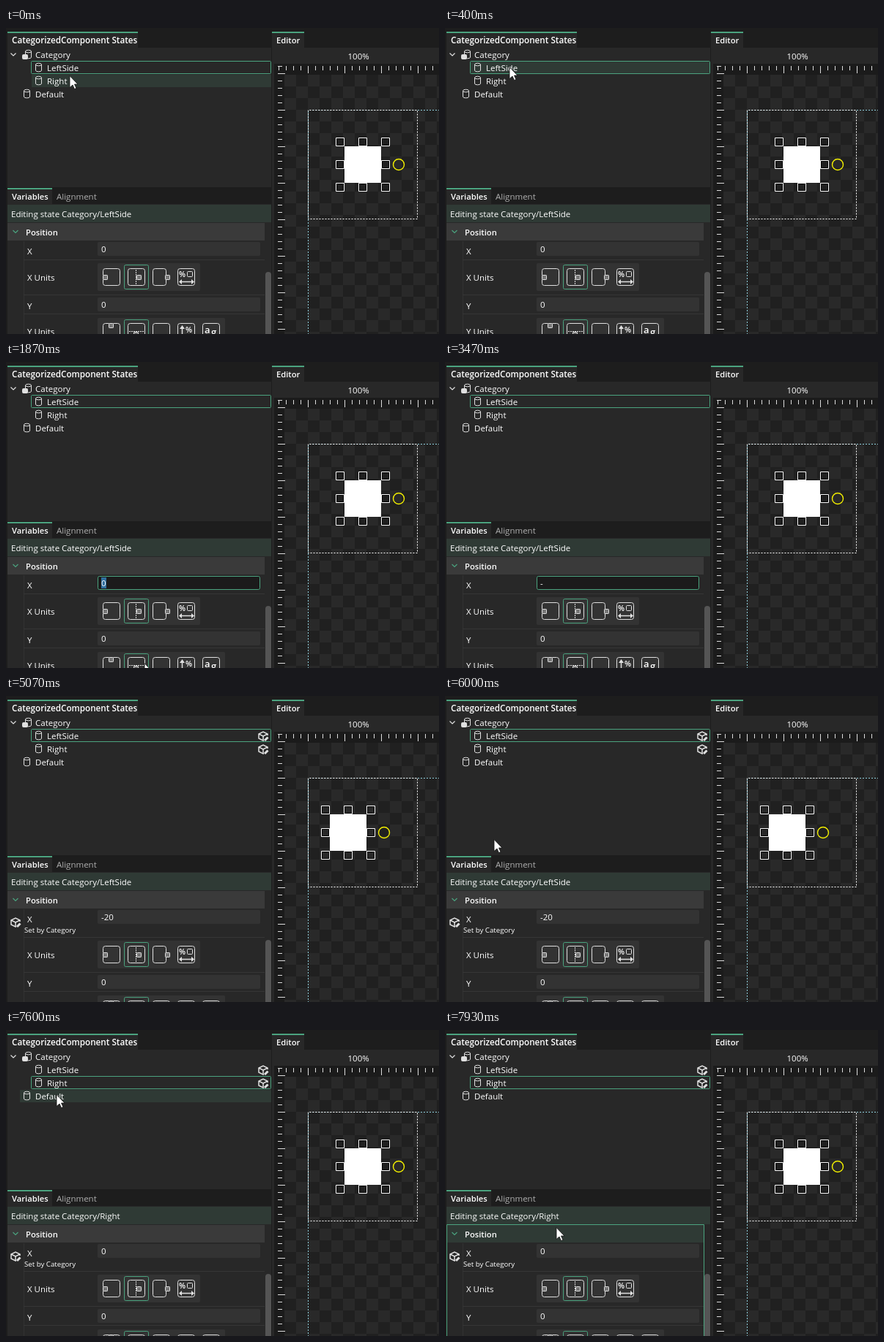
Write an HTML page with a canvas that moves like this. It is 591x419 px and loops after 8000 ms.

```html
<!DOCTYPE html>
<html lang="en">
<head>
<meta charset="utf-8">
<title>State editor</title>
<style>
html, body { margin: 0; width: 100%; height: 100%; overflow: hidden; background: #1d1d1d; }
canvas { display: block; }
</style>
</head>
<body>
<canvas id="stage" width="591" height="419"></canvas>
<script>
const ctx = document.getElementById('stage').getContext('2d');
const LOOP = 8000, FRAME = 1000 / 15;
const BACK = '#1d1d1d', PANEL = '#282828', FIELD = '#333333', HEADER = '#3a3a3a', HOVER = '#2f3a35';
const GREEN = '#4ba37f', TEXT = '#ffffff', ICON = '#e0e0e0';

// Pointer stops: time, x, y
const POINTER = [
  [0, 87, 65], [66, 87, 57], [133, 87, 52], [333, 87, 52], [400, 88, 53], [666, 88, 53],
  [1000, 160, 282], [1200, 195, 300], [1600, 195, 300], [1933, 188, 440],
  [5733, 84, 440], [5800, 82, 381], [6000, 67, 196], [6533, 62, 72], [7533, 62, 72], [7933, 159, 286], [8000, 159, 286]
];

function pointerAt(time) {
  const next = Math.max(1, POINTER.findIndex(stop => stop[0] > time));
  const [t0, x0, y0] = POINTER[next - 1], [t1, x1, y1] = POINTER[next];
  let k = (time - t0) / (t1 - t0);
  if (t0 === 6000) k = 1 - (1 - k) ** 2;
  if (t0 === 7533) k = k * k * (3 - 2 * k);
  return { x: Math.round(x0 + (x1 - x0) * k), y: Math.round(y0 + (y1 - y0) * k) };
}

function fill(x, y, w, h, color, radius = 0) {
  ctx.fillStyle = color;
  ctx.beginPath();
  ctx.roundRect(x, y, w, h, radius);
  ctx.fill();
}

function frame(x, y, w, h, color = ICON, radius = 0) {
  ctx.strokeStyle = color;
  ctx.beginPath();
  ctx.roundRect(x + .5, y + .5, w - 1, h - 1, radius);
  ctx.stroke();
}

function line(points, color = ICON, width = 1, dash = []) {
  ctx.strokeStyle = color;
  ctx.lineWidth = width;
  ctx.setLineDash(dash);
  ctx.beginPath();
  points.forEach(([x, y]) => ctx.lineTo(x, y));
  ctx.stroke();
  ctx.setLineDash([]);
  ctx.lineWidth = 1;
}

function polygon(points, color) {
  ctx.fillStyle = color;
  ctx.beginPath();
  points.forEach(([x, y]) => ctx.lineTo(x, y));
  ctx.closePath();
  ctx.fill();
}

function label(text, x, y, { size = 11.5, weight = 400, color = TEXT } = {}) {
  ctx.font = `${weight} ${size}px "Open Sans", "Noto Sans", sans-serif`;
  ctx.fillStyle = color;
  ctx.fillText(text, x, y);
  return ctx.measureText(text).width;
}

const title = (text, x, y, size = 11.2) => label(text, x, y, { size, weight: 600 });

function tab(text, x, y, w, size) {
  fill(x, y, w, 23, PANEL);
  fill(x, y, w, 2, GREEN);
  title(text, x + 6, y + 16, size);
}

function chevron(x, y, color) {
  line([[x - 3.5, y - 2], [x, y + 1.5], [x + 3.5, y - 2]], color, 1.2);
}

function cylinder(x, y) {
  ctx.strokeStyle = ICON;
  ctx.beginPath();
  ctx.ellipse(x, y - 4, 4, 1.8, 0, 0, 7);
  ctx.moveTo(x - 4, y - 4);
  ctx.lineTo(x - 4, y + 4);
  ctx.ellipse(x, y + 4, 4, 1.8, 0, Math.PI, 0, true);
  ctx.lineTo(x + 4, y - 4);
  ctx.stroke();
}

function cube(x, y) {
  line([[x + 1, y + 6], [x, y + 6], [x - 6, y + 3], [x - 6, y - 3], [x, y - 6], [x + 6, y - 3], [x + 6, y - 1]], ICON, 1.5);
  line([[x - 6, y - 3], [x, y], [x + 6, y - 3]], ICON, 1.5);
  line([[x, y], [x, y + 6]], ICON, 1.5);
  line([[x + 2, y + 6], [x + 6.5, y + 1.5]], ICON, 3);
}

function stateRow(text, y, left, hovered, selected) {
  if (hovered) fill(left, y - 9, 362 - left, 17, HOVER);
  if (selected) frame(34, y - 10, 328, 18, GREEN, 1);
  cylinder(left + 9.5, y - 1);
  label(text, left + 21, y + 4);
}

function drawStates(state, pointer) {
  tab('CategorizedComponent States', 2, 5, 178, 11.7);
  fill(2, 27, 360, 191, PANEL);
  chevron(10, 36.5, ICON);
  cylinder(30.5, 36);
  fill(22, 36, 8, 7, ICON, 2);
  label('Category', 40, 40.5);
  const over = y => pointer.x < 362 && Math.abs(pointer.y - y) < 9;
  stateRow('LeftSide', 55, 35, over(55), !state.right);
  stateRow('Right', 73, 35, over(73), state.right);
  stateRow('Default', 91, 19, over(91), false);
  if (state.set) [55, 73].forEach(y => cube(351, y));
}

function marker(x, y) {
  fill(x, y, 7, 7, '#777', 1);
  frame(x, y, 7, 7, ICON, 1);
}

const iconBox = (x, y, w = 24, h = 24) => frame(x, y, w, h, ICON, 3);

function unitGroup(y, w) {
  fill(125, y, w, 38, FIELD, 2);
  frame(161, y + 2, 34, 34, GREEN, 2);
}

function drawXUnits(y) {
  unitGroup(y, 140);
  const top = y + 7, middle = top + 9;
  iconBox(132, top);
  marker(132, middle);
  iconBox(166, top);
  line([[177.5, top + 2], [177.5, top + 22]], ICON, 1, [2, 1]);
  marker(178, middle);
  iconBox(200, top, 19);
  marker(217, middle);
  iconBox(234, top);
  label('%', 236, top + 12, { size: 10.5, weight: 600 });
  frame(247, top + 4, 8, 8, ICON, 1);
  const arrowY = top + 18.5;
  line([[239, arrowY], [254, arrowY]], ICON, 1.5);
  polygon([[236, arrowY], [240, arrowY - 3.5], [240, arrowY + 3.5]], ICON);
  polygon([[257, arrowY], [253, arrowY - 3.5], [253, arrowY + 3.5]], ICON);
}

function drawYUnits(y) {
  unitGroup(y, 174);
  const top = y + 7;
  iconBox(132, top);
  marker(140, top);
  iconBox(166, top);
  line([[168, top + 11.5], [188, top + 11.5]], ICON, 1, [2, 1]);
  marker(174, top + 12);
  iconBox(200, top, 24, 19);
  marker(208, top + 17);
  iconBox(234, top);
  line([[240.5, top + 5], [240.5, top + 20]], ICON, 1.5);
  polygon([[240.5, top + 3], [237, top + 8], [244, top + 8]], ICON);
  label('%', 245, top + 13, { size: 10.5, weight: 600 });
  iconBox(268, top);
  label('a', 271, top + 14, { size: 13, weight: 600 });
  label('g', 280, top + 17, { size: 13, weight: 600 });
}

function overXField({ x, y }) {
  return x > 125 && x < 347 && y > 292 && y < 312;
}

function drawXField(state, pointer) {
  fill(125, 293, 222, 19, state.focus ? '#1b1b1b' : FIELD, 2);
  if (state.focus || overXField(pointer)) frame(125, 293, 222, 19, GREEN, 2);
  if (state.marked) fill(130, 295, 7, 15, '#2f6f9f');
  const width = label(state.value, 130, 306.5);
  if (state.caret) fill(Math.round(130 + width), 295, 1, 15, '#fff');
}

function drawVariables(state, pointer) {
  const shift = state.set ? 13 : 0;
  tab('Variables', 2, 219, 61);
  label('Alignment', 69, 235, { color: '#b0b0b0' });
  fill(2, 241, 360, 178, PANEL);
  fill(2, 242, 360, 24, HOVER);
  label('Editing state Category/' + (state.right ? 'Right' : 'LeftSide'), 7, 259);

  const headerHover = pointer.y >= 267 && pointer.y < 292 && pointer.x < 354;
  fill(2, 267, 351, 24, headerHover ? HOVER : HEADER);
  chevron(13, 279, GREEN);
  title('Position', 27, 284);
  line([[24.5, 292], [24.5, 419]], '#333');
  [317, 365, 391].forEach(y => line([[24, y + shift + .5], [353, y + shift + .5]], '#363636'));

  label('X', 29, 310);
  if (state.set) {
    cube(13, 310);
    label('Set by Category', 25, 324, { size: 9.7 });
  }
  drawXField(state, pointer);
  label('X Units', 29, 346 + shift);
  drawXUnits(322 + shift);
  label('Y', 29, 385 + shift);
  fill(125, 369 + shift, 222, 19, FIELD, 2);
  label('0', 130, 383 + shift);
  label('Y Units', 29, 420 + shift);
  drawYUnits(397 + shift);
  fill(354, 334, 8, 95, '#555', 4);
  if (headerHover) frame(2, 266, 352, 160, GREEN);
}

function drawHandle(x, y) {
  frame(x - 6, y - 6, 12, 12, '#fff');
  frame(x - 5, y - 5, 10, 10, '#000');
}

function drawEditor(state) {
  tab('Editor', 363, 5, 44);
  fill(363, 27, 228, 392, PANEL);
  label('100%', 466.5, 43);
  fill(366, 49, 225, 370, '#1b1b1b');
  for (let y = 64; y < 419; y += 16)
    for (let x = 380; x < 591; x += 16)
      fill(x, y, 16, 16, (x - 380 + y - 64) % 32 ? '#202020' : '#292929');

  // Ruler ticks count from the canvas origin at (412, 112).
  const tick = offset => offset % 50 ? 6 : 10;
  for (let x = 372; x < 591; x += 10) fill(x, 52, 1, tick(x - 412), '#ddd');
  for (let y = 52; y < 419; y += 10) fill(371, y, tick(y - 112), 1, '#ddd');

  ctx.lineDashOffset = 2;
  line([[412.5, 112], [412.5, 419]], '#8fcfdc', 1, [2, 2]);
  line([[412, 112.5], [591, 112.5]], '#8fcfdc', 1, [2, 2]);
  ctx.setLineDash([2, 2]);
  frame(412, 112, 150, 150, '#fff');
  ctx.setLineDash([]);
  ctx.lineDashOffset = 0;

  const x = 487 + (state.right ? 0 : state.offset);
  fill(x - 25, 162, 50, 50, '#fff');
  for (const dx of [-31, 0, 31])
    for (const dy of [-31, 0, 31])
      if (dx || dy) drawHandle(x + dx, 187 + dy);
  ctx.strokeStyle = '#f4f000';
  ctx.lineWidth = 1.4;
  ctx.beginPath();
  ctx.arc(x + 49, 187, 7.5, 0, 7);
  ctx.stroke();
  ctx.lineWidth = 1;
}

function drawPointer(pointer) {
  const { x, y } = pointer;
  if (overXField(pointer)) {
    line([[x - 3, y - 8.5], [x + 4, y - 8.5]], '#fff');
    line([[x + .5, y - 8], [x + .5, y + 8]], '#fff');
    line([[x - 3, y + 8.5], [x + 4, y + 8.5]], '#fff');
    return;
  }
  const arrow = [[0, 0], [0, 16], [4, 12.5], [6.5, 18], [9, 17], [6.5, 11.5], [11, 11.5], [0, 0]]
    .map(([dx, dy]) => [x + dx, y + .5 + dy]);
  polygon(arrow, '#fff');
  line(arrow, '#111', .8);
}

function stateAt(time) {
  const within = (from, to) => time >= from && time < to;
  const right = time >= 7330;
  return {
    right,
    set: time >= 5060,
    focus: within(1460, 5060),
    marked: within(1660, 2860),
    caret: within(1460, 1660) || within(2860, 3460) || within(3600, 4130) || within(4600, 5060),
    value: right || time < 2860 ? '0' : time < 3600 ? '-' : '-20',
    offset: time >= 5060 ? -20 : 0
  };
}

function draw(now) {
  const time = Math.floor((now % LOOP) / FRAME + .001) * FRAME;
  const state = stateAt(time), pointer = pointerAt(time);
  fill(0, 0, 591, 419, BACK);
  drawStates(state, pointer);
  drawVariables(state, pointer);
  drawEditor(state);
  drawPointer(pointer);
  requestAnimationFrame(draw);
}
requestAnimationFrame(draw);
</script>
</body>
</html>
```
